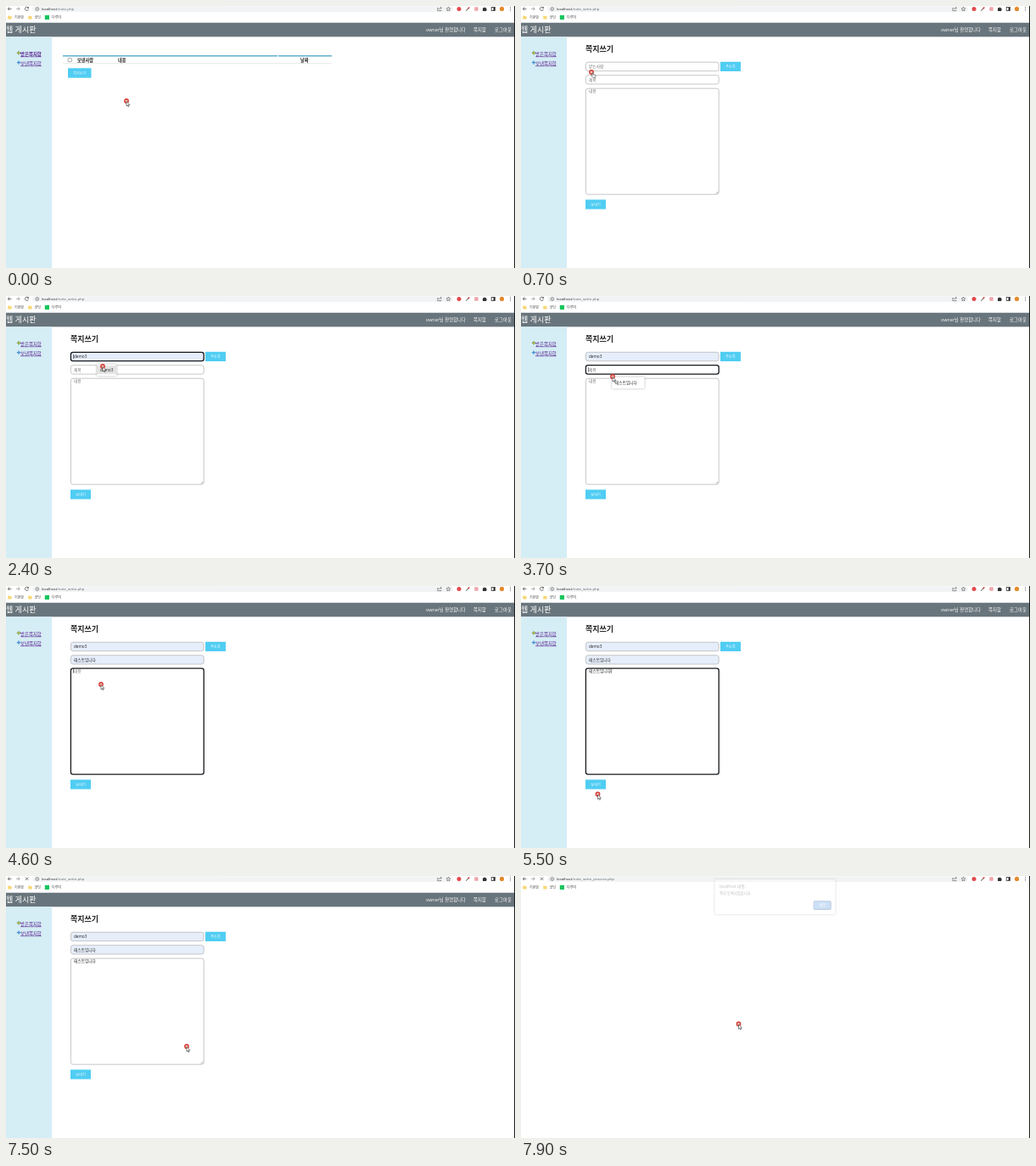
These frames come from a looping animation (600 by 309 pixels, 8 s). An HTML page:

```html
<!DOCTYPE html>
<html lang="ko">
<head>
<meta charset="utf-8">
<title>쪽지</title>
<style>
html, body { margin: 0; width: 100%; height: 100%; overflow: hidden; background: #fff; }
svg { display: block; width: 600px; height: 309px; }
text { font: 4.7px "Open Sans", "Noto Sans CJK KR", "Noto Sans CJK", sans-serif; fill: #222; white-space: pre; }
.url { font-size: 4.35px; }
.mark text { font-size: 4px; fill: #444; }
.nav text { font-size: 5.4px; fill: #fff; }
.side text { font-size: 5.4px; fill: #551a8b; text-decoration: underline; }
.bold { font-weight: 700; }
.th text { font-size: 5.2px; font-weight: 700; }
.btn rect { fill: #50cdf3; }
.btn text { font-size: 4.1px; fill: #f4fcff; text-anchor: middle; }
.field { fill: #fff; stroke: #b9b9b9; stroke-width: .8; }
.filled { fill: #e6eefb; }
.focus { stroke: #15181d; stroke-width: 1.3; }
.hint { fill: #777; }
.line { fill: none; stroke: #555; stroke-width: .8; }
.menu { filter: drop-shadow(0 .5px .8px #0005); }
.hide { display: none; }
</style>
</head>
<body>
<svg viewBox="0 0 600 309">
  <rect width="600" height="309" fill="#fff"/>

  <g id="site">
    <rect y="19.5" width="600" height="16.8" fill="#69757c"/>
    <rect y="36.3" width="54" height="273" fill="#d5edf5"/>
    <g class="nav">
      <text x="0" y="31.4" style="font-size:9px">웹 게시판</text>
      <text x="495" y="30">owner님 환영합니다</text>
      <text x="551" y="30">쪽지함</text>
      <text x="576" y="30">로그아웃</text>
    </g>
    <g class="side">
      <path d="M15 53.2V57.6M12.8 55.4H17.2" stroke="#6b9a3c" stroke-width="1.3"/>
      <circle cx="15" cy="55.4" r=".8" fill="#e0b040"/>
      <path d="M15 64.4V68.8M12.8 66.6H17.2" stroke="#4a90d0" stroke-width="1.3"/>
      <text id="inbox" x="17" y="58.6">받은쪽지함</text>
      <text x="17" y="69.6">보낸쪽지함</text>
    </g>
  </g>

  <g id="list">
    <path d="M67 58.8H320M321 58.8H384" stroke="#3f9fc6" stroke-width="1.3"/>
    <path d="M67 67.8H384" stroke="#ddd" stroke-width=".7"/>
    <rect x="73.2" y="61.5" width="4.2" height="4.2" rx=".6" fill="#fff" stroke="#777" stroke-width=".6"/>
    <g class="th">
      <text x="84" y="65.5">보낸사람</text>
      <text x="132" y="65.5">내용</text>
      <text x="347" y="65.5">날짜</text>
    </g>
    <g class="btn"><rect x="73" y="73.3" width="27.5" height="11.4"/><text x="86.8" y="80.6">쪽지쓰기</text></g>
  </g>

  <g id="form">
    <text class="bold" x="76" y="54.3" style="font-size:9px">쪽지쓰기</text>
    <rect id="toBox" class="field" x="76.4" y="66.3" width="156.8" height="10.4" rx="2.6"/>
    <rect id="subjectBox" class="field" x="76.4" y="81.7" width="156.8" height="10.4" rx="2.6"/>
    <rect id="bodyBox" class="field" x="76.4" y="97.2" width="156.8" height="125" rx="2.6"/>
    <path id="grip" d="M229.8 221.3L232.3 218.8M231.3 221.3L232.3 220.3" stroke="#777" stroke-width=".5"/>
    <text id="to" x="80" y="73.2"/>
    <text id="subject" x="80" y="88.7"/>
    <text id="body" x="80" y="102"/>
    <path id="caret" stroke="#111" stroke-width=".6"/>
    <g class="btn">
      <rect x="235" y="65.8" width="24" height="11.2"/><text x="247" y="73">주소록</text>
      <rect x="76" y="228.4" width="24" height="11.2"/><text x="88" y="235.6">보내기</text>
    </g>
    <g id="toMenu" class="menu">
      <rect x="107" y="80.4" width="23.3" height="13.8" rx=".8" fill="#fff"/>
      <rect class="row" x="107" y="82" width="23.3" height="10.2" fill="#e3e3e4"/>
      <text x="111" y="88.6">demo3</text>
    </g>
    <g id="subjectMenu" class="menu">
      <rect x="107" y="95.4" width="38.5" height="13.8" rx=".8" fill="#fff"/>
      <rect class="row" x="107" y="97.2" width="38.5" height="10.2" fill="#e3e3e4"/>
      <text x="111" y="103.8">테스트입니다</text>
    </g>
  </g>

  <g id="chrome">
    <rect width="600" height="19.5" fill="#fff"/>
    <rect x="31" y=".2" width="496" height="6.8" rx="3.4" fill="#f1f3f4"/>
    <path class="line" d="M6.5 3.3H2.2M4.2 1.4L2.2 3.3L4.2 5.2"/>
    <path class="line" style="stroke:#999" d="M12 3.3H16.2M14.2 1.4L16.2 3.3L14.2 5.2"/>
    <path id="reload" class="line" d="M26.3 2.2A2.1 2.1 0 1 0 26.5 4M26.6 1V2.6H25"/>
    <path id="stop" class="line" d="M22.9 1.6L26.3 5M26.3 1.6L22.9 5"/>
    <circle class="line" cx="36.8" cy="3.5" r="1.9" style="stroke-width:.6"/>
    <path class="line" d="M36.8 3.2V4.6M36.8 2.2V2.7" style="stroke-width:.5"/>
    <text class="url" x="42" y="5">localhost<tspan id="path" fill="#62666b"/></text>
    <path class="line" style="stroke-width:.6" d="M510 2.5H508.8V5.6H513V4.6M510.4 4Q511 2.2 513.3 2.2M512.2 1L513.4 2.2L512.2 3.4"/>
    <path class="line" style="stroke-width:.6" d="M521.5 1.1L522.2 2.7L523.9 2.9L522.6 4L523 5.7L521.5 4.8L520 5.7L520.4 4L519.1 2.9L520.8 2.7Z"/>
    <circle cx="534" cy="3.4" r="2.5" fill="#e2484d"/>
    <path d="M542.2 5.6L545 2.8" stroke="#444"/>
    <path d="M544.8 3L546.3 1.5" stroke="#d33" stroke-width="1.5"/>
    <rect x="552.2" y="1.2" width="4.5" height="4.5" rx=".7" fill="#eda5aa"/>
    <path d="M562 2.2H563.3A1 1 0 0 1 565.2 2.2H566.2V3.3A.9 .9 0 0 1 566.2 5V6H562Z" fill="#333"/>
    <rect x="572.2" y="1.5" width="4.3" height="4" fill="none" stroke="#333" stroke-width=".8"/>
    <path d="M575.3 1.5V5.5" stroke="#333" stroke-width="1.6"/>
    <circle cx="584.5" cy="3.4" r="2.6" fill="#e58a2c"/>
    <path d="M594.5 1.2V2M594.5 3V3.8M594.5 4.8V5.6" stroke="#444" stroke-width=".9"/>
    <g class="mark">
      <path d="M2.2 11.4H4L4.6 12H6.6V15.6H2.2ZM26.2 11.4H28L28.6 12H30.6V15.6H26.2Z" fill="#f8d775"/>
      <rect x="45.8" y="10.8" width="5.2" height="5.2" fill="#16c55c"/>
      <text x="10" y="15">기본함</text>
      <text x="33.5" y="15">코딩</text>
      <text x="54" y="15">다루미</text>
    </g>
  </g>

  <g id="alert">
    <rect x="228.5" y="4" width="142" height="41" rx="1.5" fill="#fff" style="filter:drop-shadow(0 .8px 1.6px #0009)"/>
    <text x="234" y="14">localhost 내용:</text>
    <text x="234" y="22.3" style="font-size:4.3px">쪽지 등록되었습니다</text>
    <rect x="345.2" y="29.8" width="20" height="9.6" rx="1.2" fill="#4d92dc" stroke="#174f96" stroke-width="1.1"/>
    <text x="355.2" y="36.2" text-anchor="middle" style="fill:#fff;font-size:4.3px">확인</text>
  </g>

  <rect x="599" width="1" height="309" fill="#1c1c1c"/>

  <g id="cursor">
    <circle r="2.2" fill="#f6c5c0" stroke="#d63b33" stroke-width="1.4"/>
    <path id="arrow" d="M0 .4V6L1.3 4.9L2.2 6.8L3.1 6.4L2.2 4.6H3.9Z" fill="#fff" stroke="#333" stroke-width=".6"/>
    <path id="hand" d="M1 .8Q1.7 .3 2 1V2.8L4.6 3.4Q5.2 3.6 5 4.4L4.5 6.3H1.8L.1 4.3Q.3 3.6 1 4Z" fill="#fff" stroke="#333" stroke-width=".6"/>
  </g>
</svg>
<script>
const LOOP = 8000, STEP = 100;
const MESSAGE = '테스트입니다';
const ui = {};
document.querySelectorAll('[id]').forEach(el => ui[el.id] = el);

// time, x, y
const route = [
  [0, 142, 112], [500, 83, 78], [1500, 83, 78], [1900, 106, 72], [2100, 106, 72],
  [2400, 114, 83], [3200, 114, 83], [3500, 107, 88], [3700, 108, 95], [3900, 114, 102],
  [4100, 114, 102], [4500, 112, 116], [5200, 112, 116], [5500, 90.5, 245.5], [5700, 89, 234],
  [6300, 89, 234], [6400, 102, 235.5], [6600, 148, 245], [6800, 176, 240], [7100, 176, 240],
  [7500, 213, 201], [7600, 213, 201], [7900, 256.5, 174.5], [8000, 256.5, 174.5]
];

function pointer(t) {
  const i = route.findIndex(p => p[0] > t);
  const [t0, x0, y0] = route[i - 1], [t1, x1, y1] = route[i];
  const k = (t - t0) / (t1 - t0);
  return [x0 + (x1 - x0) * k, y0 + (y1 - y0) * k];
}

const show = (el, on) => el.classList.toggle('hide', !on);

function setField(name, value, hint, focused, filled) {
  const text = ui[name], box = ui[name + 'Box'];
  text.textContent = value || hint;
  text.classList.toggle('hint', !value);
  box.classList.toggle('focus', focused);
  box.classList.toggle('filled', filled);
}

function setCaret(name, atEnd) {
  show(ui.caret, !!name);
  if (!name) return;
  const x = 80 + (atEnd ? ui[name].getComputedTextLength() + .4 : -.4);
  const y = +ui[name].getAttribute('y');
  ui.caret.setAttribute('d', `M${x} ${y - 4.4}V${y + .8}`);
}

function setMenu(menu, opacity, hovered) {
  menu.style.opacity = opacity;
  show(menu.querySelector('.row'), hovered);
}

function render(t) {
  const within = (a, b) => t >= a && t < b;
  const onList = t < 700, sent = t >= 7700;

  show(ui.site, !sent);
  show(ui.list, onList);
  show(ui.form, !onList && !sent);
  ui.inbox.classList.toggle('bold', onList);
  ui.path.textContent = onList ? '/note.php' : sent ? '/note_write_process.php' : '/note_write.php';

  const loading = within(500, 700) || t >= 5900;
  show(ui.reload, !loading);
  show(ui.stop, loading);

  const focus = within(2000, 3500) ? 'to' : within(3500, 4500) ? 'subject' : within(4500, 5900) ? 'body' : '';
  const typed = MESSAGE.slice(0, Math.max(0, (t - 4600) / STEP));
  setField('to', t >= 2300 ? 'demo3' : '', '받는사람', focus === 'to', t >= 2300);
  setField('subject', t >= 3900 ? MESSAGE : '', '제목', focus === 'subject', t >= 3900);
  setField('body', typed, '내용', focus === 'body', false);
  show(ui.grip, focus !== 'body');
  setCaret(focus, focus === 'to' ? t >= 2500 : focus === 'subject' ? t >= 4200 : !!typed);

  const fade = Math.min(1, Math.max(0, (3000 - t) / 400));
  setMenu(ui.toMenu, t < 2100 ? 0 : fade, t >= 2300);
  setMenu(ui.subjectMenu, within(3600, 4200) ? 1 : 0, t >= 3900);
  ui.alert.style.opacity = t < 7800 ? 0 : t < 7900 ? .1 : .28;

  const hand = within(500, 1600) || within(5700, 6400);
  show(ui.hand, hand);
  show(ui.arrow, !hand);
  ui.cursor.setAttribute('transform', `translate(${pointer(t).join(' ')})`);
}

const start = performance.now();
let last = -1;
function tick() {
  const elapsed = (performance.now() - start) % LOOP;
  const t = Math.floor(elapsed / STEP) * STEP;
  if (t !== last) render(last = t);
  requestAnimationFrame(tick);
}
tick();
</script>
</body>
</html>
```
